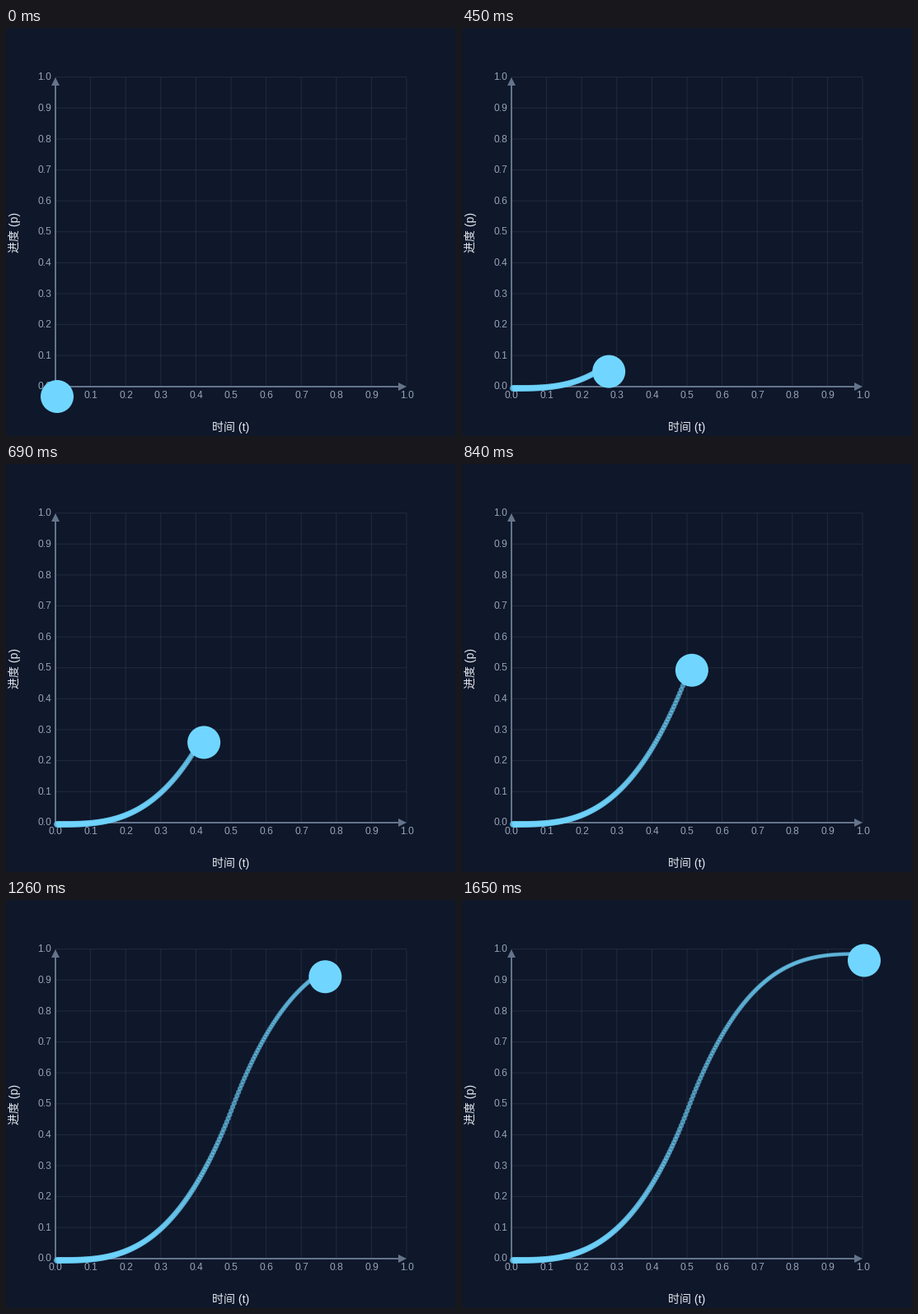
Write a matplotlib script that moves like this. It is 546 px wide and 496 px high and loops after 1680 ms.

```python
import numpy as np
import matplotlib.pyplot as plt
from matplotlib.animation import FuncAnimation
from matplotlib.patches import Circle, Polygon

W, H, DPI = 546, 496, 100
FRAMES, STEP = 56, 30
LEFT, RIGHT, TOP, BOTTOM = 60, 486, 59.7, 435.8
BG, AXIS, TICK, TITLE, BALL = "#0f172a", "#64748b", "#94a3b8", "#e2e8f0", "#70d6ff"
DOTS = 238

plt.rcParams["font.family"] = ["Liberation Sans", "Noto Sans CJK JP"]


def px(size):
    """Pixels to points."""
    return size * 72 / DPI


def ease(t):
    """Cubic ease in and out."""
    t = np.asarray(t, dtype=float)
    return np.where(t < 0.5, 4 * t**3, 1 - 4 * (1 - t) ** 3)


fig = plt.figure(figsize=(W / DPI, H / DPI), dpi=DPI, facecolor=BG)
ax = fig.add_axes([0, 0, 1, 1])
ax.set_xlim(0, W)
ax.set_ylim(H, 0)
ax.axis("off")


def line(xs, ys, color, width, **kw):
    ax.plot(xs, ys, color=color, lw=px(width), solid_capstyle="butt", **kw)


def label(x, y, text, size, color, **kw):
    ax.text(x, y, text, fontsize=px(size), color=color, va="baseline", **kw)


# Grid and tick labels
for i in range(11):
    x = LEFT + (RIGHT - LEFT) * i / 10
    y = BOTTOM + (TOP - BOTTOM) * i / 10
    line([x, x], [TOP, BOTTOM], TICK, 1, alpha=0.14, snap=False)
    line([LEFT, RIGHT], [y, y], TICK, 1, alpha=0.14, snap=False)
    label(x + 0.3, 450.4, f"{i / 10:.1f}", 12, TICK, ha="center")
    label(55.4, y + 3.6, f"{i / 10:.1f}", 12, TICK, ha="right")

# Axes with arrowheads
line([LEFT, LEFT], [BOTTOM, TOP + 4], AXIS, 2, snap=False)
line([LEFT, RIGHT - 4], [436, 436], AXIS, 2, snap=False)
for tip in ([(60, 60), (55, 70), (65, 70)], [(486, 436), (476, 431), (476, 441)]):
    ax.add_patch(Polygon(tip, color=AXIS, lw=0, zorder=3))

label(273, 490, "时间 (t)", 14, TITLE, ha="center")
label(15, 248, "进度 (p)", 14, TITLE, ha="center", rotation=90, rotation_mode="anchor")

# Trail of shrinking, fading dots
t_dots = np.arange(DOTS + 1) / DOTS
places = np.column_stack([62 + 426 * t_dots, 438 - 372.5 * ease(t_dots)])
areas = px(8 - 3.4 * t_dots) ** 2
alphas = 0.72 - 0.24 * t_dots
colors = np.array([[112 / 255, 214 / 255, 1, a] for a in alphas])
trail = ax.scatter(places[:, 0], places[:, 1], s=areas, c=colors, linewidths=0, zorder=5)

ball = Circle((62, 448), 20, facecolor=BALL, lw=0, zorder=6)
ax.add_patch(ball)


def update(i):
    t = i / (FRAMES - 1)
    n = int(t * DOTS) + 1
    trail.set_offsets(places[:n])
    trail.set_sizes(areas[:n], DPI)
    trail.set_facecolors(colors[:n])
    ball.center = (62 + 426 * t, 448 - 374.5 * float(ease(t)))
    return trail, ball


anim = FuncAnimation(fig, update, frames=FRAMES, interval=STEP, repeat=True, repeat_delay=0)
plt.show()
```
